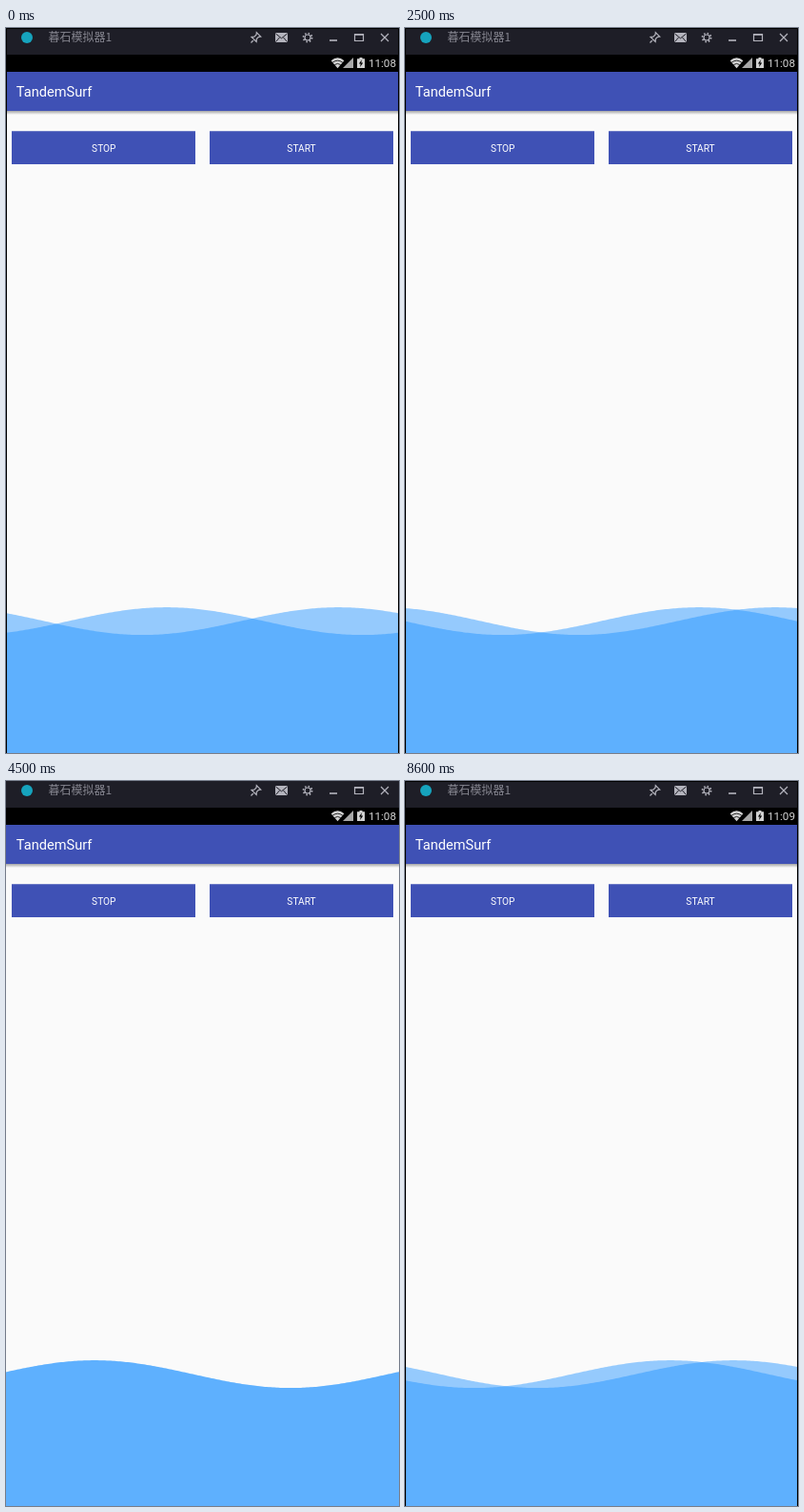
Write an HTML page that moves like this. It is 413 px wide and 761 px high and loops after 8700 ms.

```html
<!DOCTYPE html>
<html lang="en">
<head>
<meta charset="utf-8">
<title>Wave view</title>
<style>
  html, body { margin: 0; width: 100%; height: 100%; overflow: hidden; background: #fafafa; }
  svg { display: block; width: 413px; height: 761px; }
  text { font-family: Roboto, sans-serif; fill: #fff; }
  .label { font-size: 10.2px; text-anchor: middle; }
  .line { fill: none; stroke: #b4b4bd; stroke-width: 1.2; }
  .wave { fill: #1e90ff; fill-opacity: .46; }
</style>
</head>
<body>
<svg viewBox="0 0 413 761">
  <defs>
    <linearGradient id="shade" x2="0" y2="1">
      <stop offset="0" stop-color="#000" stop-opacity=".34"/>
      <stop offset="1" stop-color="#000" stop-opacity="0"/>
    </linearGradient>
  </defs>

  <rect width="413" height="761" fill="#fafafa"/>

  <!-- window title bar -->
  <rect width="413" height="28" fill="#1e1e27"/>
  <circle cx="22" cy="10" r="6" fill="#16a3bd"/>
  <text x="44.5" y="14.3" style="font-family:'Noto Sans CJK SC','Noto Sans CJK',sans-serif;font-size:12px;fill:#85858f">暮石模拟器1</text>
  <g class="line">
    <path d="M257.5 15.5l3.5-3.8M263.3 4.6l4.4 4.4-2.2.3-2.2 2.3-.2 2.8-5-5 2.8-.2 2.2-2.3z"/>
    <circle cx="317" cy="10" r="3"/>
    <circle cx="317" cy="10" r="4.5" stroke-width="1.8" stroke-dasharray="1.5 2.034"/>
    <path d="M340 13h8" stroke-width="1.6"/>
    <path d="M366.5 6.5h9v7h-9z"/>
    <path d="M366 7h10" stroke-width="1.6"/>
    <path d="M394 6l8 8M402 6l-8 8"/>
  </g>
  <rect x="283" y="5" width="13" height="10" rx="1" fill="#b4b4bd"/>
  <path d="M283.5 6l6 4.8 6-4.8M283.5 14.5l4-4.6M295.5 14.5l-4-4.6" fill="none" stroke="#1e1e27"/>

  <!-- status bar -->
  <rect y="28" width="413" height="18" fill="#000"/>
  <g fill="#d2d2d2">
    <path d="M341.6 34.2Q348.5 28.4 355.4 34.2L348.5 42.2z"/>
    <path d="M365 31v11h-11z" fill="#a8a8a8"/>
    <path d="M371.5 31h3v1.2h2.5v9.8h-8v-9.8h2.5z"/>
  </g>
  <path d="M343.2 36.2q5.3-4 10.6 0M345.3 38.6q3.2-2.4 6.4 0" fill="none" stroke="#000" stroke-width=".8"/>
  <path d="M373.9 33.3l-3 4.3h1.8l-.6 3.3 3.1-4.5h-1.9z" fill="#000"/>
  <text id="clock" x="410" y="41.3" text-anchor="end" style="font-size:11.7px;fill:#d6d6d6"></text>

  <!-- app bar and buttons -->
  <rect y="46" width="413" height="41" fill="#3f51b5"/>
  <rect y="87" width="413" height="4" fill="url(#shade)"/>
  <text x="10.8" y="72" style="font-size:14.6px">TandemSurf</text>
  <path d="M6 108.3h193V143H6zM214 108.3h193V143H214z" fill="#3f51b5"/>
  <text class="label" x="102.8" y="130">STOP</text>
  <text class="label" x="310.5" y="130">START</text>

  <path class="wave"/>
  <path class="wave"/>

  <path id="frame" d="M.5 761V.5H412.5V761" fill="none" stroke="#000"/>
</svg>
<script>
  const LOOP = 8700, STEP = 100;
  const PERIOD = 412, LEVEL = 622.6, AMPLITUDE = 14.5;

  // time, midpoint between the two crests, distance between them
  const KEYS = [
    [0, 259, 181],
    [1100, 115, 135],
    [1900, 16, 102],
    [3000, -129, 62],
    [4500, -319, 0],
    [6900, -319, 0],
    [7000, -330, -4],
    [8600, -512, -67]
  ];

  const waves = document.querySelectorAll('.wave');
  const clock = document.getElementById('clock');
  const frame = document.getElementById('frame');

  function crestsAt(time) {
    // the waves rest until the step that restarts them
    if (time > 4500 && time < 7000) time = 4500;
    const i = Math.max(1, KEYS.findIndex(key => key[0] >= time));
    const [t0, m0, d0] = KEYS[i - 1];
    const [t1, m1, d1] = KEYS[i];
    const k = (time - t0) / (t1 - t0);
    const mid = m0 + (m1 - m0) * k;
    const half = (d0 + (d1 - d0) * k) / 2;
    return [mid - half, mid + half];
  }

  function wavePath(crest) {
    let d = 'M0 761';
    for (let x = 0; x <= 414; x += 2) {
      const y = LEVEL - AMPLITUDE * Math.cos((x - crest) * 2 * Math.PI / PERIOD);
      d += `L${x} ${y.toFixed(2)}`;
    }
    return d + 'V761z';
  }

  function render(now) {
    const time = Math.min(LOOP - STEP, Math.floor(now % LOOP / STEP) * STEP);
    crestsAt(time).forEach((crest, i) => waves[i].setAttribute('d', wavePath(crest)));
    clock.textContent = time < 7900 ? '11:08' : '11:09';
    frame.style.display = time >= 4100 && time < 8200 ? 'none' : '';
  }

  const start = performance.now();
  function tick() {
    render(performance.now() - start);
    requestAnimationFrame(tick);
  }
  tick();
</script>
</body>
</html>
```
